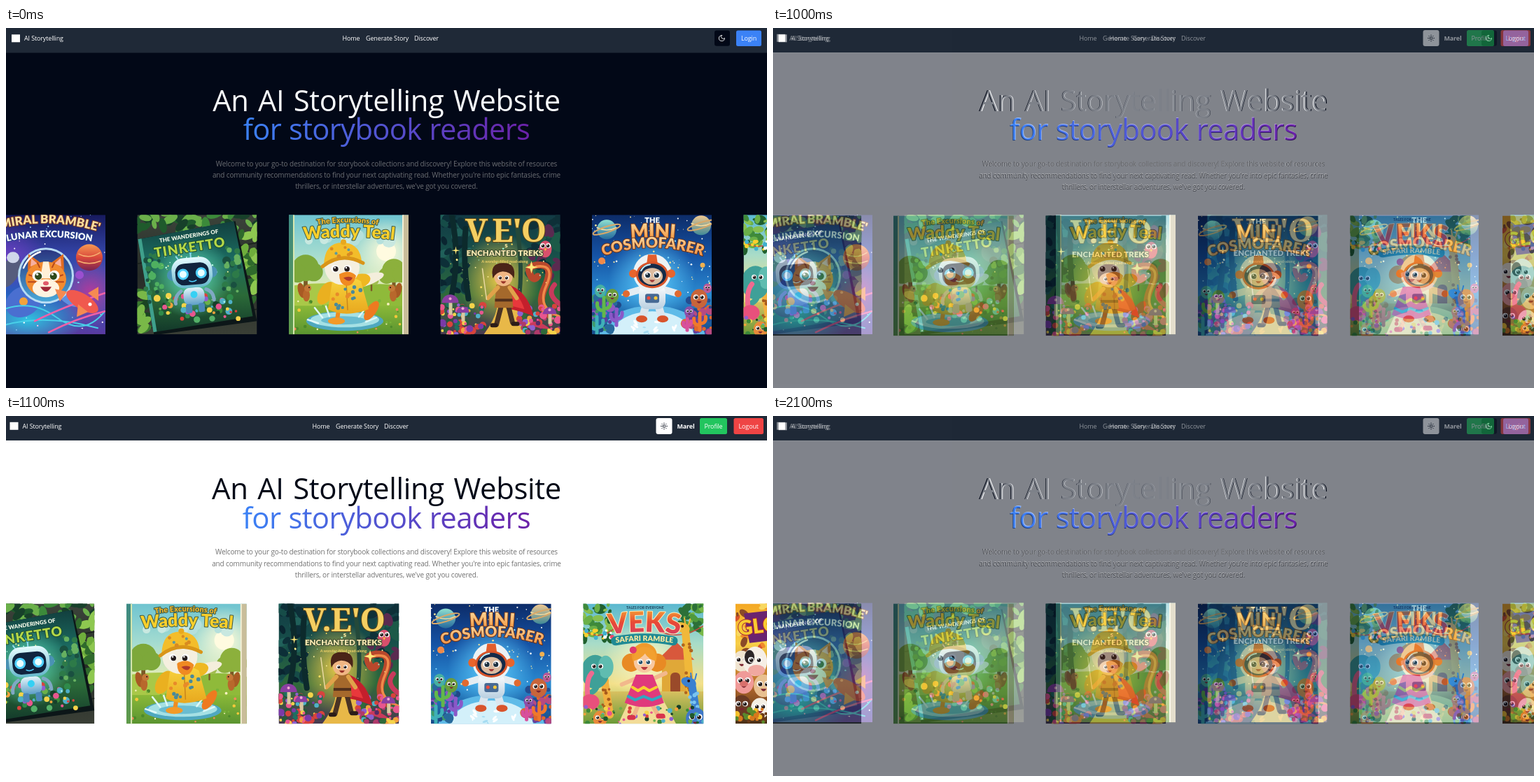
An HTML page for the animation above (2.2 s loop, 1087 px wide and 515 px high).

```html
<!DOCTYPE html>
<html lang="en">
<head>
<meta charset="utf-8">
<title>Storybooks</title>
<style>
  html, body { margin: 0; width: 100%; height: 100%; overflow: hidden; background: #020817; }
  svg { display: block; }
  text { font-family: "Open Sans", "Noto Sans", sans-serif; }
  .title { font-family: Lato, "Open Sans", sans-serif; font-weight: 900; paint-order: stroke; stroke-linejoin: round; }
  .nav { font-size: 9px; letter-spacing: -.13px; fill: #fff; }
  .lead { font-size: 10px; letter-spacing: -.15px; }
  .head { font-size: 41.7px; }
  #light { animation: swap 2200ms step-end infinite; }
  @keyframes swap {
    0% { opacity: 0; }
    45.4545% { opacity: .5; }
    50% { opacity: 1; }
    95.4545% { opacity: .5; }
    100% { opacity: 0; }
  }
</style>
</head>
<body>
<svg id="stage" width="100%" height="100%" viewBox="0 0 1087 515"></svg>
<script>
let defs = '', ids = 0, seed = 11;
const rnd = () => (seed = seed * 16807 % 2147483647) / 2147483647;
const pick = list => list[Math.floor(rnd() * list.length)];

// Shapes
const rect = (x, y, w, h, fill, r = 0) => `<rect x="${x}" y="${y}" width="${w}" height="${h}" rx="${r}" fill="${fill}"/>`;
const oval = (x, y, rx, ry, fill, turn = 0) =>
  `<ellipse cx="${x}" cy="${y}" rx="${rx}" ry="${ry}" fill="${fill}" transform="rotate(${turn} ${x} ${y})"/>`;
const circ = (x, y, r, fill) => oval(x, y, r, r, fill);
const path = (d, fill) => `<path d="${d}" fill="${fill}"/>`;
const line = (d, color, w) =>
  `<path d="${d}" fill="none" stroke="${color}" stroke-width="${w}" stroke-linecap="round" stroke-linejoin="round"/>`;
const group = (transform, inner) => `<g transform="${transform}">${inner}</g>`;

function fade(colors, kind = 'linear') {
  const id = 'fade' + ids++;
  const axis = kind === 'linear' ? 'x1="0" y1="0" x2="0" y2="1"' : '';
  const stops = colors.map((c, i) => `<stop offset="${i / (colors.length - 1)}" stop-color="${c}"/>`).join('');
  defs += `<${kind}Gradient id="${id}" ${axis}>${stops}</${kind}Gradient>`;
  return `url(#${id})`;
}
const glow = (x, y, rx, ry, color) => oval(x, y, rx, ry, fade([color, color + '00'], 'radial'));

function scatter(n, x, y, w, h, r0, r1, colors, flat = 1) {
  let out = '';
  for (let i = 0; i < n; i++) {
    const r = r0 + rnd() * (r1 - r0);
    out += oval((x + rnd() * w).toFixed(1), (y + rnd() * h).toFixed(1), r.toFixed(1), (r * flat).toFixed(1),
      pick(colors), flat === 1 ? 0 : Math.floor(rnd() * 180));
  }
  return out;
}

// Lettering
const word = (s, x, y, size, fill, edge = 'none', more = '') =>
  `<text class="title" x="${x}" y="${y}" font-size="${size}" fill="${fill}" stroke="${edge}" stroke-width="2" text-anchor="middle" ${more}>${s}</text>`;
function arc(s, x, y, w, rise, size, fill, edge = 'none') {
  const id = 'arc' + ids++;
  defs += `<path id="${id}" d="M${x - w / 2} ${y}q${w / 2} ${-2 * rise} ${w} 0"/>`;
  return `<text class="title" font-size="${size}" fill="${fill}" stroke="${edge}" stroke-width="2" text-anchor="middle">` +
    `<textPath href="#${id}" startOffset="50%">${s}</textPath></text>`;
}

// Figures
const eyes = (x, y, gap, r, iris = '#231a1a') => [-gap, gap].map(d =>
  circ(x + d, y, r, '#fff') + circ(x + d * .9, y + r * .1, r * .68, iris) + circ(x + d * .9 - r * .2, y - r * .25, r * .22, '#fff')).join('');
const smile = (x, y, w, color) => path(`M${x - w} ${y}q${w} ${w * 1.7} ${2 * w} 0z`, color);
const critter = (x, y, r, color) => oval(x, y, r, r * 1.15, color) + eyes(x, y - r * .2, r * .38, r * .3) + smile(x, y + r * .3, r * .3, '#7a2430');
const tree = (x, y, r, leaf) => line(`M${x} ${y}v${r * 2}`, '#7a5a26', r * .3) +
  circ(x, y, r, leaf) + circ(x - r * .6, y + r * .4, r * .7, leaf) + circ(x + r * .6, y + r * .3, r * .7, leaf);
const blooms = ['#e8568f', '#f2a23c', '#8f5fd0', '#f4d34a', '#4fb0c8', '#d8433c'];
const leaves = ['#1f5a2c', '#3c8a3a', '#6bb04a', '#17402a'];

const cat = () => rect(0, 0, 171, 171, fade(['#171a5e', '#3445a8', '#285fc0', '#5a3aa0'])) +
  glow(30, 60, 60, 50, '#6a3fc0') + glow(150, 110, 50, 50, '#b03a9c') + glow(60, 150, 80, 40, '#2fc3e0') +
  scatter(55, 0, 0, 171, 171, .3, 1.2, ['#fff', '#9fd8ff', '#ffc6ee']) +
  oval(148, 61, 19, 19, fade(['#f79a52', '#d9483c', '#7a2352'])) + line('M133 56q15 8 30 -2M132 66q16 7 32 0', '#f7b070', 1.5) +
  circ(134, 86, 6, '#9a4fd0') + oval(54, 124, 27, 21, '#4a6fd0', -30) + oval(34, 82, 13, 24, '#565c7d', 28) +
  oval(39, 61, 9, 8, '#cfd6ea') + oval(117, 117, 9, 20, '#5f8fe0', -50) + circ(54, 124, 6, '#f2a23c') +
  circ(86, 87, 40, '#b8dcf4') + circ(86, 87, 37, fade(['#2a3580', '#4aa8d8'])) +
  path('M60 80l1 -24l18 13zM112 80l-1 -24l-18 13z', '#e06c22') + path('M64 74l1 -12l9 8zM108 74l-1 -12l-9 8z', '#f7b0a0') +
  oval(86, 92, 29, 25, '#f28b30') + path('M82 67h8l4 24h-16z', '#fff0d8') + oval(86, 105, 19, 13, '#fff3e0') +
  line('M62 86l9 3M61 96l10 0M110 86l-9 3M111 96l-10 0M74 69l3 6M98 69l-3 6', '#b8481c', 2) +
  eyes(86, 87, 12, 7.5, '#2f4a1c') + oval(86, 98, 4, 3, '#e05a6a') + smile(86, 103, 8, '#a02838') +
  line('M54 76q8 -18 24 -23', '#fff', 2.5) +
  line('M10 142q50 -26 90 4t70 -8M20 160q60 -20 140 2', '#49d0e8', 2) + line('M70 152q40 -20 100 -40M90 168q40 -20 80 -30', '#f060a8', 2.5) +
  oval(138, 124, 26, 11, '#f0594e', 32) + path('M116 110l-17 -4l7 18zM146 112l15 -9l0 20zM132 128l-2 18l16 -7z', '#f58a52') + circ(149, 128, 2.5, '#fff') +
  arc("ADMIRAL BRAMBLE'S", 84, 25, 162, 13, 17, '#f8dfa0', '#7a3a24') + arc('LUNAR EXCURSION', 91, 39, 130, 7, 13, '#fff', '#27408c');

const robot = () => rect(0, 0, 171, 171, fade(['#3b433a', '#272d28', '#3a3f36'])) +
  line('M0 70l171 -30M0 120l171 -30M0 165l171 -30', '#1a201c', 1.5) +
  scatter(42, 0, -4, 171, 24, 6, 14, leaves, .5) + scatter(26, 148, 20, 24, 120, 6, 13, ['#6fae3c', '#8ec850', '#2f6a2c'], .55) +
  scatter(16, 0, 100, 12, 70, 6, 13, ['#3a7a30', '#79b848', '#1a4522'], .55) +
  path('M1 35l139 -26l31 143l-147 20z', '#0c1618') + path('M1 35l137 -26l27 136l-142 23z', fade(['#123f3e', '#1b6a60', '#2b6a38', '#12382a'])) +
  path('M1 35l5 -1l22 133l-5 1z', '#3fa08c') + glow(78, 90, 58, 58, '#62e0bc') +
  scatter(60, 24, 114, 124, 36, 1, 5, [...blooms, ...leaves, '#2f8a4a', '#54b068']) +
  scatter(22, 12, 55, 24, 70, 2, 6, ['#2d7a48', '#4fb060', '#1a5040']) + scatter(22, 122, 45, 24, 70, 2, 6, ['#2d7a48', '#66b060', '#1a5040']) +
  scatter(25, 20, 55, 120, 80, .5, 1.3, ['#f8f2a0', '#b8ffe8']) +
  group('rotate(-5 78 80)', line('M78 63v-10M62 66l-5 -8', '#94dcf0', 2) + circ(78, 52, 3, '#5fe0ff') +
    line('M60 108q-10 6 -9 17M96 108q10 4 10 16', '#7fa8c4', 5) + rect(63, 104, 30, 25, fade(['#e4f4fa', '#5d9fc8']), 9) +
    rect(65, 127, 9, 13, '#4a87b8', 3) + rect(83, 127, 9, 13, '#4a87b8', 3) + circ(78, 114, 5, '#35d0f4') +
    circ(50, 84, 8, '#4a92b4') + circ(106, 84, 8, '#4a92b4') + rect(49, 61, 58, 43, fade(['#e6fbff', '#66b8cc']), 17) +
    rect(54, 69, 48, 31, '#10243e', 12) + circ(65, 84, 8, '#4fd0ff') + circ(91, 84, 8, '#4fd0ff') +
    circ(65, 84, 5, '#eaffff') + circ(91, 84, 5, '#eaffff') + line('M73 94q5 3 10 0', '#4fd0ff', 1.5)) +
  word('THE WANDERINGS OF', 74, 33, 8, '#f2f8e8', 'none', 'transform="rotate(-9 74 33)"') +
  word('TINKETTO', 76, 53, 19, '#b4d848', '#1a4a34', 'transform="rotate(-9 76 53)" letter-spacing="1"');

const duck = () => rect(0, 0, 171, 171, fade(['#6fc4d0', '#a5dcd0', '#f0eeb0', '#a8c850'])) + glow(139, 52, 48, 48, '#fffbd8') +
  circ(139, 52, 14, '#fffbe0') + scatter(9, 12, 28, 150, 10, 5, 10, ['#c8e8e0', '#b5e0dc']) +
  oval(50, 122, 90, 24, '#a9c848') + oval(130, 125, 70, 26, '#8fba3a') + rect(0, 130, 171, 41, fade(['#8ab838', '#5a9430'])) +
  tree(24, 76, 19, '#7da83a') + tree(150, 80, 17, '#8cb03c') + tree(118, 92, 8, '#a0bc50') +
  scatter(50, 8, 118, 155, 50, .8, 2.5, ['#f8f2c0', '#f5c83a', '#4c8a2a', '#78b43a', '#f08a5a']) +
  oval(80, 152, 55, 14, '#4fa8c0') + oval(80, 150, 49, 11, '#a5e0e4') + oval(78, 151, 32, 6, '#69bcd0') +
  line('M48 147l-11 -14M58 145l-5 -14M100 146l10 -13M42 155l-15 -5M110 153l15 -6', '#dff8f8', 2.5) +
  line('M72 130l-3 20M96 128l16 8', '#ee8c22', 6) + oval(68, 152, 12, 5, '#f39a28') + oval(118, 137, 16, 7, '#ee7a20', -55) +
  oval(108, 94, 29, 8, '#f4eedc', -18) + oval(100, 95, 17, 10, '#eeb822', -18) + oval(53, 112, 10, 18, '#eab020', 30) +
  path('M62 95q21 -12 41 0l11 40q-34 13 -58 0z', fade(['#f8d43e', '#e8a81e'])) +
  line('M82 96l2 40', '#c9851a', 1.5) + scatter(15, 62, 102, 42, 32, 2, 3, ['#4a8a9a', '#e88a2a']) +
  circ(76, 75, 25, '#f5efdf') + path('M50 72q1 -35 31 -32q21 3 23 27q-22 -15 -54 5z', '#f3bd2a') +
  line('M48 74q27 -22 58 -5', '#d99518', 5) + scatter(7, 60, 46, 32, 14, 2, 3, ['#d98a20', '#5a9aa0']) +
  circ(78, 39, 4, '#e8a81e') + eyes(75, 77, 9, 5.5) + path('M72 85q14 -8 24 2q-4 17 -16 14q-8 -3 -8 -16z', '#f08a22') + path('M78 90q8 -3 13 0q-4 9 -13 0z', '#b03a2c') +
  [[25, 111, 1], [149, 111, -1]].map(([x, y, d]) => oval(x - 7 * d, y - 3, 5, 11, '#a85a24', -14 * d) + oval(x, y + 4, 5, 9, '#b8682c') + circ(x + 2 * d, y - 6, 5, '#c47838') + circ(x + 4 * d, y - 7, 1, '#211')).join('') +
  rect(0, 0, 8, 171, fade(['#3d8a84', '#5f9a48'])) + rect(6, 0, 2, 171, '#d8e8b0') + rect(163, 0, 8, 171, '#c9bd9a') + rect(162, 0, 2, 171, '#f3efd4') +
  arc('The Excursions of', 84, 15, 92, 4, 11, '#f5b82a', '#3a5a48') + arc('Waddy Teal', 86, 36, 132, 4, 25, '#f9cf2c', '#3a5a4a');

const forest = () => rect(0, 0, 171, 171, fade(['#123a44', '#17504a', '#2f6a3a', '#4a3a50'])) + glow(84, 92, 58, 66, '#e8c848') +
  scatter(40, 0, 0, 40, 110, 4, 11, ['#0d2f38', '#164c48', '#20605a', '#0a2530'], .6) +
  scatter(36, 125, 0, 46, 90, 4, 11, ['#0e3038', '#1c5a48', '#5a2a50'], .6) +
  line('M16 0q14 70 -4 130M36 20q-4 50 4 100', '#0c2a2c', 8) + line('M110 20q8 60 2 100', '#24493a', 6) +
  path('M62 171q30 -40 14 -66h20q16 34 26 66z', '#e8b848') +
  line('M171 150q-38 -10 -22 -46t-12 -32q-14 2 -9 13t11 3', '#b8482c', 10) + line('M171 146q-34 -12 -20 -44t-14 -28', '#f08a4a', 3.5) +
  line('M160 171q-22 -22 -40 -11M171 128q-20 -14 -8 -28', '#c83a5c', 7) +
  oval(150, 49, 9, 12, '#d8506c') + eyes(150, 44, 4, 3.6) + path('M148 48h4l-2 4z', '#f4c040') +
  scatter(70, 0, 128, 62, 43, 1.5, 5.5, [...blooms, '#7a3aa8', '#245a3a', '#1f7060']) + scatter(60, 110, 130, 61, 41, 1.5, 5.5, [...blooms, '#b03a6a', '#2f6a3a', '#532a68']) +
  [[14, 124, 12], [32, 138, 9], [156, 140, 10]].map(([x, y, r]) => rect(x - 2, y, 5, r * 1.6, '#d8c8a0') + path(`M${x - r} ${y + 2}a${r} ${r} 0 0 1 ${2 * r} 0z`, '#8a3fa0') + circ(x, y - 4, 2, '#f0a8d0')).join('') +
  scatter(45, 12, 38, 140, 100, .4, 1.5, ['#fff2a0', '#ffe060', '#9ff0d0']) +
  path('M93 98q32 10 40 47q-19 -8 -39 -11z', '#c41f2c') + path('M93 100q20 13 27 35l-20 -5z', '#e8383c') +
  line('M87 130l-7 27M97 130l6 24', '#4a3324', 7) + line('M79 158h-5M104 156h6', '#2c1c18', 6) +
  path('M80 100h21l3 33h-27z', '#a5692c') + rect(78, 120, 25, 4, '#52301c') + line('M82 104l-14 15M99 104l10 15', '#e0a24a', 6) + line('M66 121l-6 -44', '#e8d8a0', 1.5) +
  oval(90, 89, 13, 13, '#f0b684') + path('M75 91q-5 -22 14 -22q20 -1 16 22q-5 -10 -16 -10q-10 1 -14 10z', '#4a2418') + eyes(90, 90, 5, 3) + smile(90, 95, 4, '#9a3428') +
  path('M130 66l2 7l7 2l-7 2l-2 7l-2 -7l-7 -2l7 -2zM22 45l1 5l5 1l-5 1l-1 5l-1 -5l-5 -1l5 -1z', '#ffe878') +
  word("V.E'O", 93, 39, 46, '#f4cf62', '#5a4418', 'style="font-family:\'Noto Serif\',serif;font-weight:700" letter-spacing="-1"') +
  word('s', 94, 47, 10, '#fbe9a0') + word('ENCHANTED TREKS', 92, 59, 11.5, '#fcebb4', '#3a4a30') + word('A wonder-filled read-along', 92, 69, 5.5, '#e0c864');

const ringed = (x, y, r, a, b) => circ(x, y, r, fade([a, b])) + line(`M${x - r} ${y - r * .2}q${r} ${r * .5} ${2 * r} 0`, '#f6dca0', 1.5) +
  `<ellipse cx="${x}" cy="${y}" rx="${r * 1.45}" ry="${r * .3}" fill="none" stroke="#d9a868" stroke-width="2" transform="rotate(-18 ${x} ${y})"/>`;
const coral = (x, y, h, color) => line(`M${x} ${y}v${-h}M${x} ${y - h * .3}q${-h * .4} 0 ${-h * .35} ${-h * .4}M${x} ${y - h * .4}q${h * .4} 0 ${h * .35} ${-h * .4}`, color, 5);
const space = () => rect(0, 0, 171, 171, fade(['#0d2c68', '#1552a4', '#2a8ad0', '#174a88'])) + glow(86, 90, 62, 62, '#5fd0ff') +
  scatter(85, 0, 0, 171, 125, .4, 1.4, ['#fff', '#ffe898', '#8fe0ff']) +
  ringed(21, 21, 14, '#8fe0d0', '#256a9c') + ringed(156, 15, 14, '#f0c890', '#3f8a98') + circ(14, 66, 5, '#f08a4a') + circ(158, 72, 3.5, '#f0b050') +
  oval(86, 176, 76, 46, '#5fbbe8') + oval(86, 176, 60, 38, '#d3f0fa') + scatter(14, 50, 146, 74, 25, 2, 5, ['#a5dcf2', '#fff'], .4) +
  scatter(40, 0, 118, 38, 52, 2, 7, ['#276a9c', '#3f9a6a', '#5a3fa0', '#8f58c0', '#1f4888']) + scatter(40, 132, 118, 39, 52, 2, 7, ['#e0682c', '#6a3f9c', '#b84a80', '#244c90']) +
  coral(17, 145, 27, '#62b84a') + coral(35, 158, 23, '#8a58c8') + coral(154, 165, 24, '#f0782c') + coral(136, 165, 16, '#d8509c') + coral(7, 171, 25, '#3fb0b8') +
  critter(12, 109, 8, '#48b0a0') + critter(29, 116, 9, '#6a9a3c') + critter(153, 120, 12, '#c8653a') + critter(139, 139, 7, '#8a4fa8') + critter(165, 105, 6, '#b85a98') +
  line('M69 107l-17 5M103 107l17 5', '#e4edf2', 10) + circ(49, 113, 5, '#e06a30') + circ(123, 113, 5, '#e06a30') +
  line('M78 127l-6 20M94 127l6 20', '#dbe6ee', 11) + oval(71, 149, 8, 5, '#d8542c') + oval(101, 149, 8, 5, '#d8542c') +
  rect(67, 100, 38, 35, fade(['#fff', '#b8cfe0']), 11) + rect(76, 113, 20, 13, '#476a94', 3) + circ(81, 119, 2.5, '#f04a3a') + circ(91, 119, 2.5, '#f8c83a') +
  circ(86, 83, 27, '#ecf2f4') + path('M80 57h12l2 14h-16z', '#e25e2c') + circ(59, 84, 6, '#e8642c') + circ(113, 84, 6, '#e8642c') + oval(86, 86, 23, 19, '#d8552a') + oval(86, 86, 20, 16, '#142a48') +
  oval(86, 88, 15, 12, '#dcbca0') + eyes(86, 86, 7, 5.2, '#1c3040') + smile(86, 93, 4, '#a03a38') + line('M70 80q4 -8 13 -9', '#bfefff', 2) +
  word('THE', 86, 12, 11, '#fff', '#17407c') + arc('MINI', 87, 34, 75, 2, 27, fade(['#ffe9b0', '#f08a30']), '#7a3a1c') + arc('COSMOFARER', 87, 58, 138, 11, 21, fade(['#ffe2a8', '#f08a3a']), '#6a321c');

const giraffe = (x, y, h, color, spot) => line(`M${x + 8} ${y + h}L${x} ${y}`, color, 11) + oval(x - 4, y, 11, 7, color, 20) +
  line(`M${x} ${y - 5}l-1 -8M${x + 5} ${y - 4}l2 -8`, color, 2) + circ(x - 4, y - 2, 2, '#211') + scatter(12, x - 3, y + 10, 12, h - 10, 1.5, 3, [spot]);
const zoo = () => rect(0, 0, 171, 171, fade(['#5ab8d0', '#a8dcc8', '#f4e08a', '#7ab048'])) + glow(88, 80, 60, 55, '#fff6c0') +
  scatter(36, 0, 0, 40, 52, 3, 9, ['#3f8a3a', '#6ab048', '#20602e', '#88c050'], .6) + scatter(30, 138, 0, 33, 40, 3, 9, ['#4f9a3c', '#78b848', '#2c7038'], .6) +
  line('M0 38q24 16 46 -4M110 40q30 12 60 -8', '#c8483c', 1.5) + scatter(20, 2, 38, 42, 12, 1.5, 3, ['#f04a6a', '#f8d030', '#fff', '#40b0d0']) +
  path('M112 80h40v50h-40z', '#e0a838') + path('M106 80l26 -26l26 26z', '#d8583c') + rect(124, 98, 14, 32, '#9a4a2a', 6) +
  rect(0, 125, 171, 46, fade(['#d8c060', '#6a9a38'])) + path('M50 171l24 -52h30l28 52z', '#f2dc98') +
  giraffe(145, 34, 96, '#f0b83a', '#b0641e') + giraffe(30, 108, 50, '#f2b040', '#a85a1c') +
  oval(17, 97, 20, 24, '#3fa098') + oval(32, 90, 11, 16, '#5fbcb0') + eyes(20, 89, 5, 3.5) + line('M20 98q4 22 -8 28', '#3fa098', 8) +
  line('M7 135q-4 -26 5 -36', '#f06a90', 7) + oval(10, 140, 13, 11, '#e8507c') + giraffe(154, 112, 50, '#3a80d0', '#79c4f0') + critter(160, 164, 14, '#3f78c8') + critter(24, 164, 10, '#e88a3a') +
  scatter(60, 0, 146, 171, 25, 1, 3.5, [...blooms, ...leaves]) +
  line('M80 140l-8 20M96 140l10 18', '#f0b488', 6) + line('M71 162h-5M107 160h6', '#d8344c', 7) +
  line('M74 107l-19 8M99 107l18 -8', '#f2b88c', 6) + path('M75 101h24l16 40q-28 12 -56 0z', '#e03a7c') +
  line('M70 119l8 5l8 -5l8 5l10 -5', '#f8d030', 4) + line('M64 132l10 5l12 -5l12 5l12 -5', '#30a8c0', 4) +
  circ(68, 84, 13, '#e88a24') + circ(105, 84, 13, '#e88a24') + circ(87, 74, 18, '#f09a2c') + oval(87, 83, 15, 15, '#f8c8a0') +
  path('M71 82q3 -22 17 -20q15 0 16 20q-12 -3 -16 -11q-6 8 -17 11z', '#f2a030') + eyes(87, 83, 6, 4, '#25506a') + smile(87, 90, 5, '#b83a40') + circ(71, 66, 5, '#e0386c') +
  word('TALES FOR EVERYONE', 88, 7, 5, '#24506a') + arc('VEKS', 87, 44, 105, 4, 40, fade(['#f8c838', '#e84a34', '#d03878']), '#fff0c0') +
  line('M46 53q42 -8 82 0', '#1f8a94', 13) + arc('SAFARI RAMBLE', 87, 56, 84, 3, 10.5, '#fdeaa0');

const farm = () => rect(0, 0, 171, 171, fade(['#f4a824', '#f8cf48', '#b86a2c', '#4a3018'])) +
  scatter(24, 0, 0, 60, 70, 3, 8, ['#f08a28', '#d8542c', '#f8d860', '#8a4a28'], .6) +
  path('M12 14l90 -10v42l-82 10z', '#6a2470') + word('GLOWS', 57, 39, 29, '#f8cc30', '#a82c38', 'transform="rotate(-7 57 39)"') +
  critter(9, 82, 13, '#f0e4d0') + oval(28, 82, 17, 21, '#f6efe6') + oval(20, 76, 7, 10, '#2c2526') + oval(30, 95, 12, 8, '#f0a8a0') + eyes(28, 80, 6, 4) +
  critter(12, 112, 14, '#f09a98') + oval(12, 114, 6, 4, '#d8706c') + critter(40, 117, 14, '#e8c090') + critter(9, 145, 13, '#6a3a24') + critter(35, 149, 13, '#f4efe4') +
  scatter(50, 0, 150, 90, 21, 2, 5, ['#f4c02c', '#d8781c', '#6a3a18', '#5a8a2c']);

const covers = [cat, robot, duck, forest, space, zoo, farm].map(draw => draw());

// Page
const label = (s, x, y, more = '') => `<text class="nav" x="${x}" y="${y}" ${more}>${s}</text>`;
const middle = (cls, s, y, fill, more) =>
  `<text class="${cls}" x="543.5" y="${y}" text-anchor="middle" fill="${fill}" style="${more}">${s}</text>`;

defs += `<linearGradient id="blend" gradientUnits="userSpaceOnUse" x1="339" x2="748" y1="0" y2="0">
  <stop stop-color="#3b82f6"/><stop offset="1" stop-color="#6b21a8"/></linearGradient>`;

const lead = [
  'Welcome to your go-to destination for storybook collections and discovery! Explore this website of resources',
  "and community recommendations to find your next captivating read. Whether you're into epic fantasies, crime",
  "thrillers, or interstellar adventures, we've got you covered."
];

function content(ink, grey, first, x0) {
  const row = covers.slice(first, first + 6).map((art, i) =>
    `<svg x="${x0 + i * 216.5}" y="267.3" width="171" height="171" viewBox="0 0 171 171">${art}</svg>`).join('');
  return middle('head', 'An AI Storytelling Website', 118.7, ink, 'letter-spacing:-.35px;word-spacing:3px') +
    middle('head', 'for storybook readers', 160, 'url(#blend)', 'letter-spacing:-.7px;word-spacing:1px') +
    lead.map((s, i) => middle('lead', s, 197.6 + i * 15.95, grey, '')).join('') + row;
}

const bar = (h, x, y, navX) => rect(0, 0, 1087, h, '#1f2937') + rect(x, y - 9, 12, 11, '#fff') + label('AI Storytelling', x + 18, y) +
  label('Home', navX, y) + label('Generate Story', navX + 33.5, y) + label('Discover', navX + 102.5, y);

const moon = group('translate(1017 9.1) scale(.45)', line('M12 3a6 6 0 0 0 9 9 9 9 0 1 1-9-9Z', '#fff', 2));
const sun = group('translate(934.6 9.1) scale(.45)', line('M8 12a4 4 0 1 0 8 0a4 4 0 1 0 -8 0M12 2v2M12 20v2M4.9 4.9l1.4 1.4M17.7 17.7l1.4 1.4M2 12h2M20 12h2M6.3 17.7l-1.4 1.4M19.1 4.9l-1.4 1.4', '#020817', 2));

const dark = rect(0, 0, 1087, 515, '#020817') + content('#f8fafc', '#6b6d72', 0, -29) + bar(35.5, 8, 18.3, 480.5) +
  rect(1012, 3.5, 22, 22.3, '#020817', 3) + moon + rect(1043, 3.5, 36, 22.5, '#3b82f6', 2.5) + label('Login', 1061, 18.3, 'text-anchor="middle"');

const light = rect(0, 0, 1087, 515, '#fff') +
  group('translate(543.5) scale(1.0045) translate(-543.5)', content('#020817', '#737373', 1, -42.8)) + bar(35, 5.5, 17.8, 437.5) +
  rect(928.5, 3, 23, 23, '#fff', 3) + sun + label('Marel', 971, 17.8, 'text-anchor="middle" font-weight="700"') +
  rect(991, 3, 39, 23, '#22c55e', 2.5) + label('Profile', 1010.5, 17.8, 'text-anchor="middle"') +
  rect(1039.5, 3, 42.5, 23, '#ef4444', 2.5) + label('Logout', 1060.7, 17.8, 'text-anchor="middle"');

document.getElementById('stage').innerHTML = `<defs>${defs}</defs><g>${dark}</g><g id="light">${light}</g>`;
</script>
</body>
</html>
```
